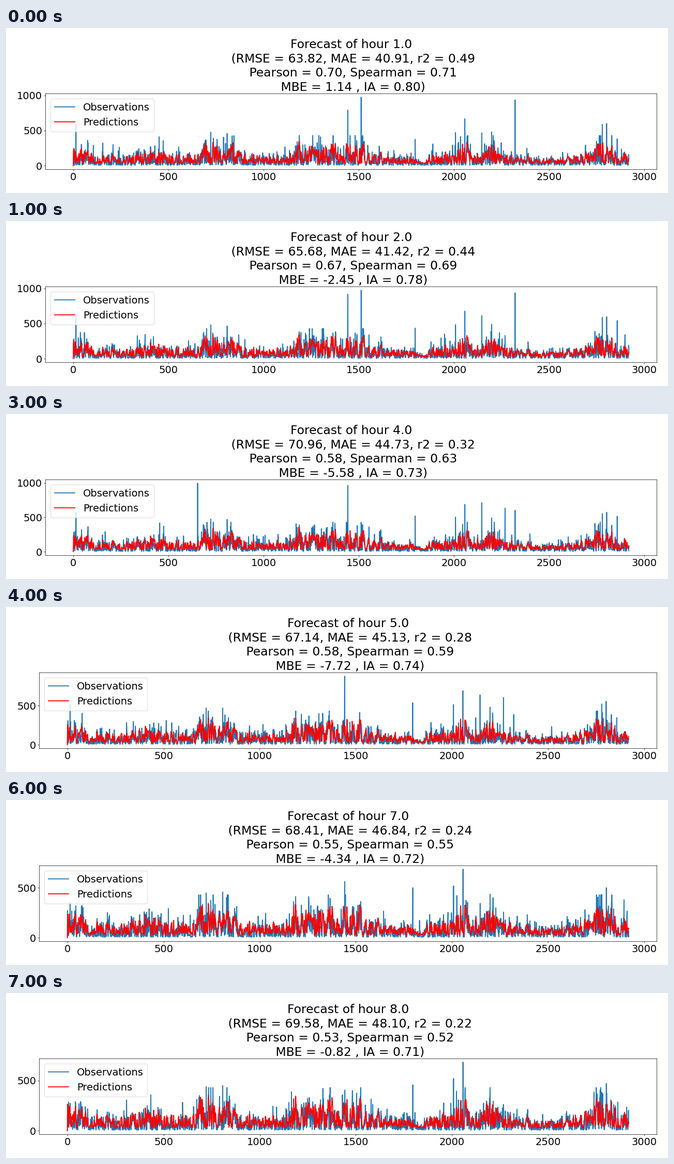
Recreate the animation shown at these times as a matplotlib script. Size 1280x320 px, loop 8 s.

```python
import matplotlib.pyplot as plt
import numpy as np
from matplotlib.animation import FuncAnimation

plt.rcParams["font.family"] = "DejaVu Sans"
plt.rcParams["font.size"] = 22
plt.rcParams["lines.linewidth"] = 2

N = 2920
HOURS = 8
FLOOR = 25
CALM = 140

# Scores at the key hours; the hours between are interpolated
KEY_HOURS = [1, 2, 4, 5, 6, 8]
SCORES = {
    "rmse": [63.82, 65.68, 70.96, 67.14, 67.25, 69.58],
    "mae": [40.91, 41.42, 44.73, 45.13, 45.59, 48.10],
    "r2": [0.49, 0.44, 0.32, 0.28, 0.27, 0.22],
    "pearson": [0.70, 0.67, 0.58, 0.58, 0.57, 0.53],
    "spearman": [0.71, 0.69, 0.63, 0.59, 0.58, 0.52],
    "mbe": [1.14, -2.45, -5.58, -7.72, -7.86, -0.82],
    "ia": [0.80, 0.78, 0.73, 0.74, 0.74, 0.71],
}
TITLE = (
    "Forecast of hour {hour:.1f}\n"
    " (RMSE = {rmse:.2f}, MAE = {mae:.2f}, r2 = {r2:.2f}\n"
    " Pearson = {pearson:.2f}, Spearman = {spearman:.2f}\n"
    " MBE = {mbe:.2f} , IA = {ia:.2f})"
)

# Polluted and clean spells: place, width, change of level
SPELLS = [
    (25, 35, 140), (440, 45, 90), (725, 40, 190), (820, 35, 120),
    (1185, 20, 230), (1320, 70, 170), (1490, 60, 110), (1830, 25, -90),
    (2055, 22, 230), (2205, 22, 190), (2480, 110, -50), (2790, 30, 240),
]
# Extremes that rise and fade over the hours: place, height, hour, spread
EXTREMES = [
    (14, 610, 2.3, 4.5), (653, 998, 4, 0.3), (722, 480, 2, 14),
    (808, 470, 4, 14), (1256, 520, 6, 1.2), (1442, 985, 3.3, 3.5),
    (1512, 1011, 1.5, 1.9), (1796, 535, 5.2, 5), (2008, 520, 8, 16),
    (2057, 690, 5.5, 18), (2146, 720, 3.6, 2.8), (2198, 495, 3, 8),
    (2268, 640, 4.3, 2), (2321, 955, 1.5, 2.6), (2779, 590, 1.5, 7),
    (2802, 600, 1, 10), (2857, 600, 2.9, 2),
]


def bell(x, centre, spread):
    return np.exp(-0.5 * ((x - centre) / spread) ** 2)


def smooth_noise(rng, width):
    kernel = np.ones(width) / np.sqrt(width)
    return np.convolve(rng.normal(size=N), kernel, "same")


def squash(z):
    return 1 / (1 + np.exp(-1.6 * z))


steps = np.arange(N)
base_rng = np.random.default_rng(11)
level = CALM + sum(h * bell(steps, x, w) for x, w, h in SPELLS)
level *= np.exp(0.18 * smooth_noise(base_rng, 15))
level = level.clip(40, 420)
weather = smooth_noise(base_rng, 4)


def make_series(hour):
    rng = np.random.default_rng(100 + hour)
    pred_mix = squash(0.95 * weather + 0.3 * smooth_noise(rng, 4))
    pred = FLOOR + (level - FLOOR) * pred_mix ** 1.15

    obs_mix = squash(0.7 * weather + 0.7 * smooth_noise(rng, 2))
    obs = 5 + level * obs_mix ** 1.5 * np.exp(0.3 * rng.normal(size=N))
    gusts = rng.random(N) < 0.025
    obs[gusts] *= 1 + 0.7 * rng.exponential(size=gusts.sum())
    obs = np.minimum(obs, 1.2 * level + 110).clip(4, 430)

    for x, height, centre, spread in EXTREMES:
        obs[x] = max(obs[x], height * bell(hour, centre, spread))
    obs[0] = pred[0] = 0
    return obs, pred


SERIES = [make_series(hour) for hour in range(1, HOURS + 1)]

fig, ax = plt.subplots(figsize=(20, 5), dpi=64)
obs_line, = ax.plot(steps, SERIES[0][0], label="Observations")
pred_line, = ax.plot(steps, SERIES[0][1], color="red", label="Predictions")
ax.legend(loc="upper left")
ax.set_xticks(range(0, 3001, 500))
margin = 0.05 * (N - 1)
ax.set_xlim(-margin, N - 1 + margin)


def update(i):
    obs, pred = SERIES[i]
    obs_line.set_ydata(obs)
    pred_line.set_ydata(pred)

    top = 1.05 * obs.max()
    ax.set_yticks(np.arange(0, top, 500))
    ax.set_ylim(-0.05 * obs.max(), top)

    hour = i + 1
    scores = {name: np.interp(hour, KEY_HOURS, values)
              for name, values in SCORES.items()}
    ax.set_title(TITLE.format(hour=hour, **scores), linespacing=1.26)
    fig.tight_layout()
    return obs_line, pred_line


anim = FuncAnimation(fig, update, frames=HOURS, interval=1000, repeat=True,
                     repeat_delay=0)
plt.show()
```
